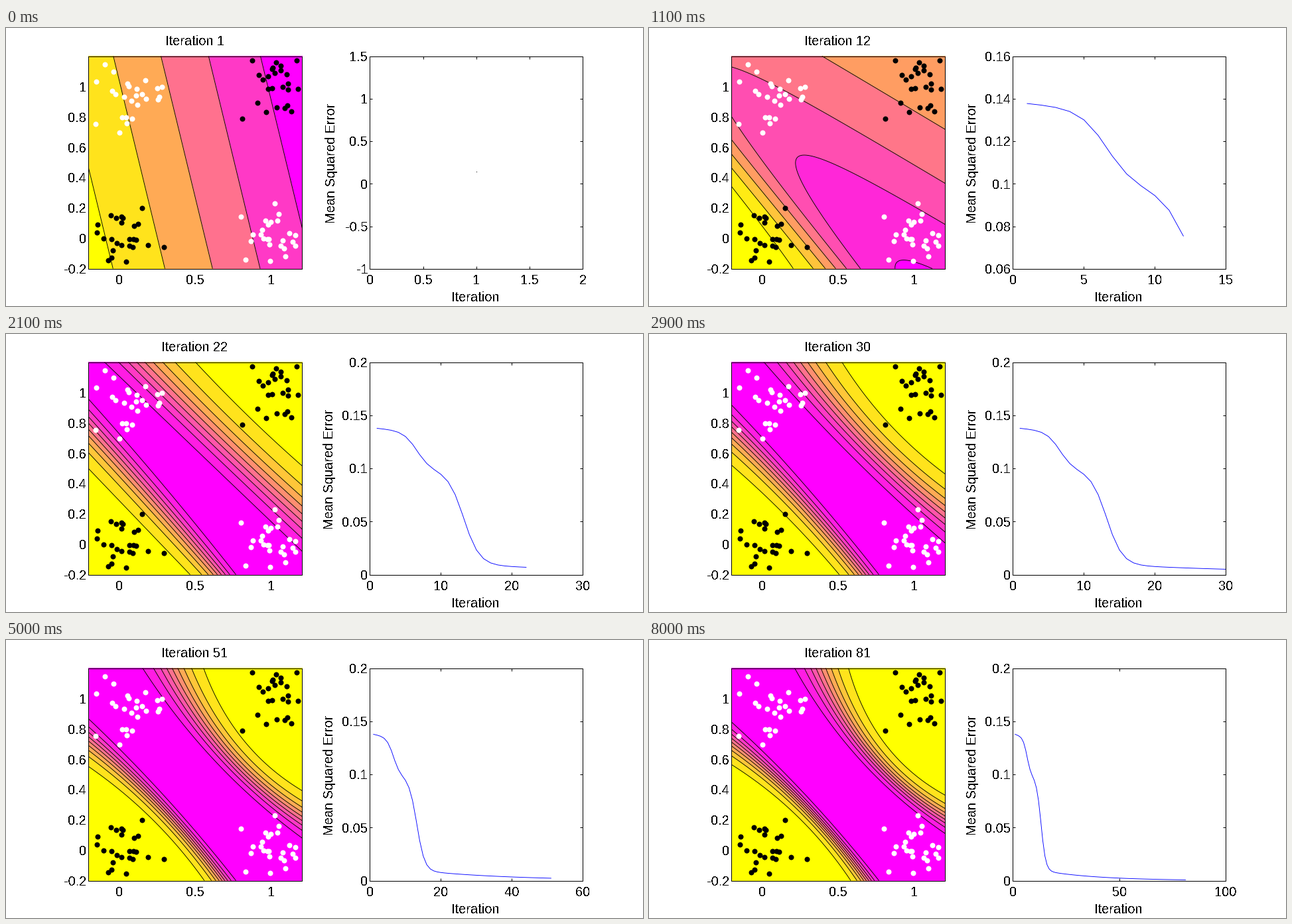
Animation, 960 px wide and 420 px high, one loop 8100 ms. Source, as a matplotlib script:

```python
import math
import numpy as np
import matplotlib.pyplot as plt
from matplotlib.animation import FuncAnimation

W, H, DPI = 960, 420, 100
PX = 72 / DPI
FRAMES, INTERVAL = 81, 100
plt.rcParams["font.family"] = "Liberation Sans"
plt.rcParams["font.size"] = 20 * PX
plt.rcParams["text.antialiased"] = False

LEFT, RIGHT, TOP, BOTTOM = 124, 446, 42, 363      # decision map
PLOT_L, PLOT_R = 548, 869                         # error plot
LOW, HIGH = -.2, 1.2                              # map data range

STEPS = np.arange(1, FRAMES + 1)
X, Y = np.meshgrid(np.linspace(LEFT, RIGHT, 162), np.linspace(TOP, BOTTOM, 162))


def sigmoid(v):
    return 1 / (1 + np.exp(-v))


def rescale(v, a, b, c, d):
    return c + (d - c) * (v - a) / (b - a)


def map_x(v):
    return rescale(v, LOW, HIGH, LEFT, RIGHT)


def map_y(v):
    return rescale(v, LOW, HIGH, BOTTOM, TOP)


def rotate(x, y):
    """Coordinates along and across the falling diagonal."""
    return (x - 285 + y - 202) / 2, (x - 285 - y + 202) / 2


U, V = rotate(X, Y)

# Two sudden drops on top of a slow decay
MSE = (.016 * np.exp(-STEPS / 26) + .0354 * sigmoid((6.6 - STEPS) / .95)
       + .087 * sigmoid((13.2 - STEPS) / 1.1))


def cluster(rng, cx, cy, count=25):
    points = rng.normal((cx, cy), .12, (4 * count, 2))
    inside = np.all((points > LOW + .01) & (points < HIGH - .02), axis=1)
    return points[inside][:count]


rng = np.random.RandomState(7)
WHITE = np.vstack([cluster(rng, .05, .97), cluster(rng, 1, .02)])
BLACK = np.vstack([cluster(rng, .03, .04), cluster(rng, 1.03, 1)])


def edge(start, bow, end):
    """A shallow arc between two points of the map border."""
    (u0, v0), (u1, v1) = rotate(*start), rotate(*end)
    d = (2 * U - u0 - u1) / (u1 - u0)
    return (v0 + v1) / 2 + d * (v1 - v0) / 2 + bow * (1 - d * d)


def ramp(inner, outer):
    """Logit rising from output .1 at the inner edge to .9 at the outer one."""
    q = (V - inner) / (outer - inner)
    rise = (1 - np.exp(-.6 * np.clip(q, -20, 20))) / (1 - math.exp(-.6))
    return math.log(9) * (2 * rise - 1)


def band_logit(n):
    p = 1 - math.exp(-(n - 22) / 20)

    def ease(a, b):
        return a + (b - a) * p

    def upper(x, bow, y):
        return edge((x, TOP), bow, (RIGHT, y))

    def lower(y, bow, x):
        return edge((LEFT, y), bow, (x, BOTTOM))

    top = ramp(upper(ease(148, 223), ease(0, -15), ease(328, 290)),
               upper(ease(285, 301), ease(-2, -19), ease(199, 236)))
    bottom = ramp(lower(ease(98, 125), ease(2, 5), 346),
                  lower(ease(203, 187), ease(0, 10), ease(277, 305)))
    return np.maximum(top, bottom)


def early_logit():
    return -.00565 * (X - (Y - TOP) / 4.13 - 233)


def middle_logit():
    s = X + .95 * (BOTTOM - Y)
    r = Y - .6 * X
    return .155 - .32 * np.logaddexp(0, (r + 96) / 40) + 4.7 * sigmoid((275 - s) / 38)


def network_output(n):
    """Learning progress, measured by the error, blends the three phases."""
    def progress(a, b):
        return (MSE[a - 1] - MSE[n - 1]) / (MSE[a - 1] - MSE[b - 1])

    if n <= 12:
        a, b, w = early_logit(), middle_logit(), progress(1, 12)
    elif n <= 22:
        a, b, w = middle_logit(), band_logit(22), progress(12, 22)
    else:
        a, b, w = 0, band_logit(n), 1
    return sigmoid(np.clip(a * (1 - w) + b * w, -30, 30))


fig = plt.figure(figsize=(W / DPI, H / DPI), dpi=DPI, facecolor="white")
ax = fig.add_axes([0, 0, 1, 1])


def ruled(x, y):
    # The quarter pixel keeps snapping on the intended pixel.
    ax.plot(np.array(x) - .25, np.array(y) + .25, color="black", lw=PX,
            solid_capstyle="butt", zorder=4)


def box(left, right):
    ruled([left, right, right, left, left], [TOP, TOP, BOTTOM, BOTTOM, TOP])


def label(x, baseline, text, ha="center"):
    ax.text(x, baseline, text, ha=ha, va="baseline", color="black")


def draw_map(n):
    z = network_output(n)
    levels = [k / 10 for k in range(1, 10) if z.min() < k / 10 < z.max()]
    count = len(levels)
    span = count if count == 9 else count - .5
    shades = [min(1, k / span) for k in range(count + 1)]
    ax.contourf(X, Y, z, levels=[-.1] + levels + [1.1],
                colors=[(1, t, 1 - t) for t in shades], antialiased=False, zorder=1)
    ax.contour(X, Y, z, levels=levels, colors="black", linewidths=.9 * PX, zorder=2)
    box(LEFT, RIGHT)
    for points, color in ((WHITE, "white"), (BLACK, "black")):
        ax.plot(map_x(points[:, 0]), map_y(points[:, 1]), "o", color=color,
                ms=8 * PX, mew=0, zorder=5)
    for v in (0, .5, 1):
        label(map_x(v), 387, f"{v:g}")
    for k in range(-1, 6):
        label(121, map_y(k / 5) + 7.5, f"{k / 5:g}", "right")
    label(284, 26, f"Iteration {n}")


def ticks(low, high, most, headroom=0):
    """Round tick values around a range, at most `most` intervals."""
    if low == high:
        low, high = low - 1, high + 1
    for step in (m * 10 ** e for e in range(-4, 3) for m in (1, 2, 5)):
        first = math.floor(low / step + 1e-9)
        last = math.ceil(high / step + headroom - 1e-9)
        if last - first <= most:
            return [round(i * step, 6) for i in range(first, last + 1)]


def draw_error(n):
    errors = MSE[:n]
    x_ticks = ticks(1, n, 4)
    y_ticks = ticks(errors.min(), errors.max(), 6, headroom=.3)

    def to_x(v):
        return rescale(v, x_ticks[0], x_ticks[-1], PLOT_L, PLOT_R)

    def to_y(v):
        return rescale(v, y_ticks[0], y_ticks[-1], BOTTOM, TOP)

    box(PLOT_L, PLOT_R)
    for v in x_ticks:
        x = to_x(v)
        ruled([x, x], [BOTTOM, BOTTOM - 4])
        ruled([x, x], [TOP, TOP + 4])
        label(x, 387, f"{v:g}")
    names = [f"{v:g}" for v in y_ticks]
    for v, name in zip(y_ticks, names):
        y = to_y(v)
        ruled([PLOT_L, PLOT_L + 4], [y, y])
        ruled([PLOT_R, PLOT_R - 4], [y, y])
        label(545, y + 7.5, name, "right")
    if n == 1:
        ax.plot(to_x(1), to_y(MSE[0]), "s", color="black", ms=PX, mew=0)
    else:
        ax.plot(to_x(STEPS[:n]), to_y(errors), color="blue", lw=.9 * PX, zorder=3)
    label(707, 413, "Iteration")
    widest = max(len(name) - .3 * name.count("-") for name in names)
    ax.text(487 - 11 * (widest - 4), 204, "Mean Squared Error", rotation=90,
            ha="center", va="center")


def update(frame):
    ax.clear()
    ax.axis("off")
    draw_map(frame + 1)
    draw_error(frame + 1)
    ax.set(xlim=(-.5, W - .5), ylim=(H - .5, -.5))
    return []


anim = FuncAnimation(fig, update, frames=FRAMES, interval=INTERVAL,
                     init_func=lambda: [], repeat=True, repeat_delay=0, blit=False)
plt.show()
```
